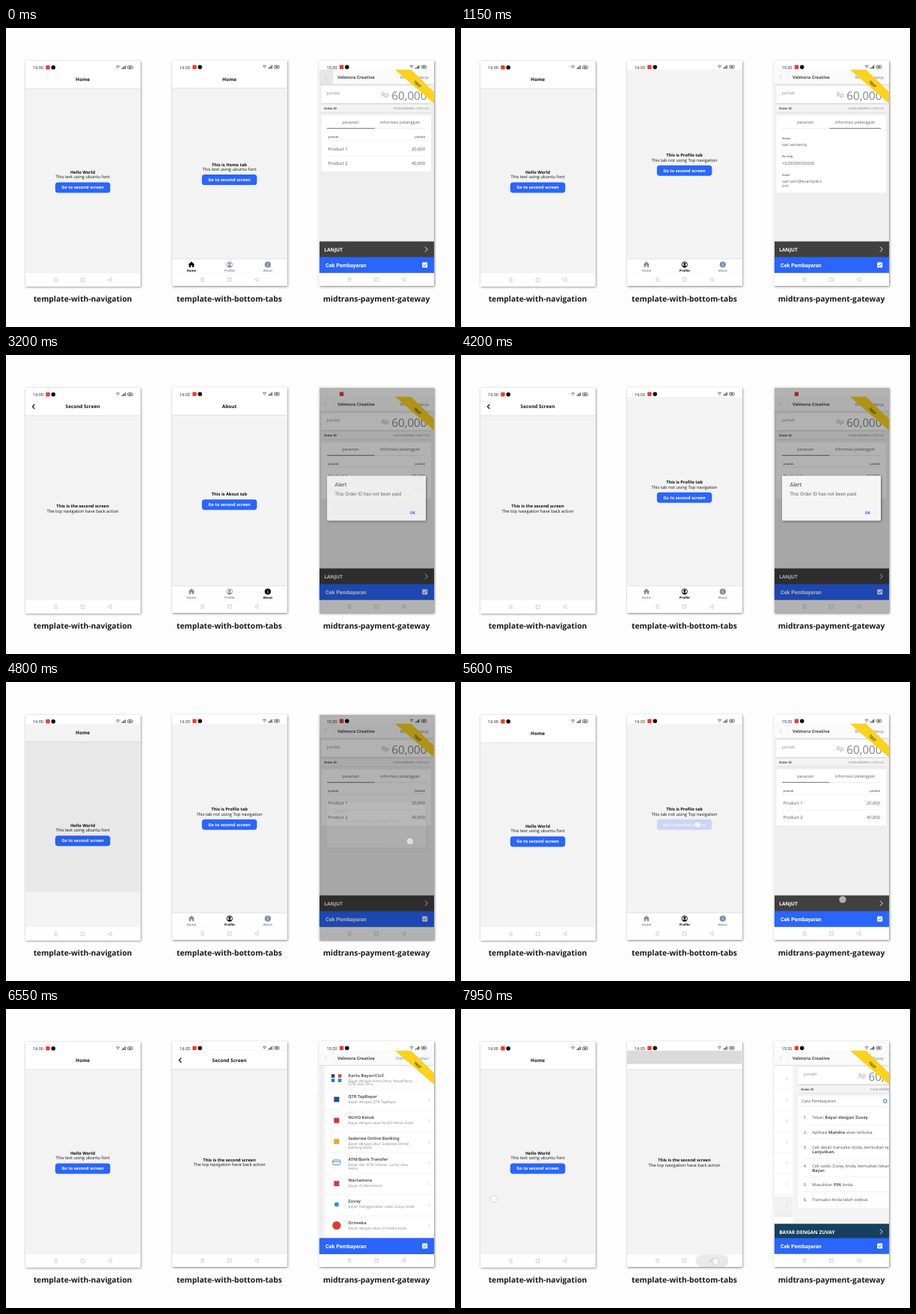
Recreate the animation shown at these times as an HTML page. Size 600 by 400 pixels, loop 8000 ms.

```html
<!DOCTYPE html>
<html lang="en">
<head>
<meta charset="utf-8">
<title>App templates</title>
<style>
html, body { margin: 0; width: 100%; height: 100%; overflow: hidden; background: #fefdfd; }
svg { display: block; width: 600px; height: 400px; }
text { font-family: "Open Sans", "Noto Sans", sans-serif; text-rendering: geometricPrecision; }
.b { font-weight: 700; }
.m { text-anchor: middle; }
.e { text-anchor: end; }
.r { font-family: Roboto, "Liberation Sans", sans-serif; }
</style>
</head>
<body>
<svg id="stage" viewBox="0 0 600 400"></svg>
<script>
const LOOP = 8000, W = 153.5, TOP = 56, BOTTOM = 328, H = BOTTOM - TOP, BLUE = '#2a65fd';

// Drawing helpers; x is local to a phone
const txt = (x, y, s, size, cls = '', fill = '#111') =>
  `<text x="${x}" y="${y}" font-size="${size}" class="${cls}" fill="${fill}">${s}</text>`;
const box = (x, y, w, h, fill, extra = '') =>
  `<rect x="${x}" y="${y}" width="${w}" height="${h}" fill="${fill}" ${extra}/>`;
const path = (d, stroke, w = 0.8, fill = 'none') =>
  `<path d="${d}" stroke="${stroke}" stroke-width="${w}" fill="${fill}"/>`;
const group = (id, body, extra = '') => `<g id="${id}" ${extra}>${body}</g>`;
const hline = (y, x1, x2, c = '#e4e4e4', w = 0.6) => path(`M${x1} ${y}H${x2}`, c, w);

const status = time => group('', txt(10, 55, time, 5.6, 'r', '#333') +
  box(27.2, 50, 5.4, 5.4, '#ee3b36', 'rx="1"') + '<circle cx="37.2" cy="52.7" r="2.8" fill="#111"/>' +
  path('M121 51.5q2.5-2 5 0M122.2 53q1.4-1 2.6 0M123.5 54.4h.6', '#444', 0.8) +
  path('M129 55v-1.5M130.5 55v-2.6M132 55v-3.8M133.3 55v-4.8', '#333', 0.9) +
  box(136.5, 50.7, 6.8, 3.9, 'none', 'rx="1.6" stroke="#444" stroke-width=".8"') +
  box(138.2, 51.9, 3.2, 1.5, '#444'), 'class="status"');

const navBar = box(0, BOTTOM, W, 18, '#fefefe') + group('', '', 'class="ripple"') +
  path('M38 335h5.2M38 337.1h5.2M38 339.2h5.2', '#bdbdbd', 0.7) +
  path('M74.3 334.8h4.6v4.6h-4.6z', '#bdbdbd', 0.7) +
  path('M115 334.4v5.2l-4.8-2.6z', '#bdbdbd', 0.7);

const phone = (id, x, y, time, body, label) => `<g id="${id}" transform="translate(${x} ${y})">
  ${box(0, 44, W, 301.5, '#fff', 'filter="url(#shadow)"')}
  <g clip-path="url(#screen)">${box(0, 44, W, 302, '#fff')}${status(time)}${navBar}
  <g clip-path="url(#app)">${body}</g><g class="top"></g></g>
  ${txt(76.5, 366.4 - y, label, 10.3, 'b m', '#1b1b1b')}</g>`;

const header = title => box(0, TOP, W, 25, '#fff') + hline(81, 0, W, '#d6d6d6', 0.7) +
  txt(76.5, 71.3, title, 6.4, 'b m');
const button = (id, y) => group(id, box(39.8, y, 73.5, 14, BLUE, 'rx="3.6"') +
  txt(76.5, y + 9, 'Go to second screen', 5.7, 'b m', '#fff'));
const intro = (y, title, sub) => txt(76.5, y, title, 5.7, 'b m') + (sub ? txt(76.5, y + 6.5, sub, 5.75, 'm') : '');
const page = body => box(0, TOP, W, H + 8, '#f3f3f3') + body;
const second = page(header('Second Screen') + path('M12.3 66l-3 3 3 3', '#111', 1.1) +
  intro(204.2, 'This is the second screen', 'The top navigation have back action'));

// Old screen below, new screen revealed from the bottom edge
const stack = (id, first) => group(id + 'Old', first) + box(0, TOP, W, H, '#000', `id="${id}Shade"`) +
  `<clipPath id="${id}Clip"><rect id="${id}Cut" width="${W}" height="400"/></clipPath>` +
  `<g clip-path="url(#${id}Clip)">${group(id + 'New', second)}</g>`;

const tabIcons = [
  (x, c) => `<path d="M${x - 4.4} 317l4.4-4 4.4 4h-1.2v3.6h-2.2v-2.5h-2v2.5h-2.2v-3.6z" fill="${c}"/>`,
  (x, c) => `<circle cx="${x}" cy="317" r="3.7" fill="none" stroke="${c}" stroke-width=".9"/>` +
    `<circle cx="${x}" cy="315.9" r="1.6" fill="${c}"/><path d="M${x - 2.7} 319.4q2.7-3.4 5.4 0-2.7 2.6-5.4 0" fill="${c}"/>`,
  (x, c) => `<circle cx="${x}" cy="317" r="4.1" fill="${c}"/>` + path(`M${x} 316.4v2.6M${x} 314.7v.9`, '#fff', 0.9)
];
const tabBar = active => box(0, 309.5, W, 19, '#fff') + hline(309.5, 0, W, '#d6d6d6', 0.7) +
  ['Home', 'Profile', 'About'].map((name, i) => {
    const x = 25.8 + 51 * i, on = i === active;
    return tabIcons[i](x, on ? '#000' : '#7f8ea8') + txt(x, 326, name, 4.2, 'b m', on ? '#000' : '#8b919b');
  }).join('');

const tabs = [
  header('Home') + intro(185, 'This is Home tab', 'This text using ubuntu font') + button('', 196.5),
  intro(172.6, 'This is Profile tab', 'This tab not using Top navigation') + button('press2', 184.2),
  header('About') + intro(188, 'This is About tab') + button('', 193.7)
].map((body, i) => group('tab' + i, page(body + tabBar(i)))).join('');

// Payment screens
const amount = box(3, 78.5, 146.5, 35, '#fff') + box(3, 102, 146.5, 11.5, '#f3f3f3') +
  hline(101.7, 3, 149.5, '#b0b0b0', 0.7) + hline(113.6, 3, 149.5, '#d0d0d0') +
  txt(10, 89, 'jumlah', 5.5, '', '#8a8a8a') + txt(83.3, 92.5, 'Rp', 8, '', '#999') +
  txt(144, 96.7, '60,000', 15.2, 'e', '#858585') +
  txt(6.5, 109.6, 'Order ID', 4, 'b', '#444') + txt(146.5, 109.6, 'YOUR-ORDERID-12351123', 3.9, 'e', '#777');

const tabHead = (x1, x2) => txt(42, 128.6, 'pesanan', 5.6, 'm', '#666') +
  txt(108, 128.6, 'informasi pelanggan', 5.6, 'm', '#666') +
  hline(134.8, 10.5, 142.5, '#d8d8d8') + hline(134.8, x1, x2, '#8d8d8d', 1.3);
const items = [['Product 1', '20,000'], ['Product 2', '40,000']].map(([name, cost], i) =>
  hline(150.6 + 21 * i, 10.5, 142.5, '#e6e6e6') + txt(12, 164.2 + 19 * i, name, 5.8, '', '#555') +
  txt(141.5, 164.2 + 19 * i, cost, 5.8, 'e', '#555')).join('');
const order = group('goods', box(3, 117.5, 146.5, 75, '#fff') + tabHead(10.5, 74) +
  txt(12, 147.5, 'produk', 3.9, 'b', '#777') + txt(141.5, 147.5, 'jumlah', 3.9, 'b e', '#777') + items);
const buyer = group('buyer', box(3, 117.5, 146.5, 103.5, '#fff') + tabHead(74, 142.5) +
  [['Nama', 'sari winanta'], ['No telp.', '+620000000000'], ['Email', 'sari.win@example.c']].map(([k, v], i) =>
    txt(10.5, 149 + 24.5 * i, k, 3.9, 'b', '#777') + txt(10.5, 158.8 + 24.5 * i, v, 5.8, '', '#666')).join('') +
  txt(10.5, 213.8, 'om', 5.8, '', '#666'));

const methods = [
  ['Kartu Bayar/Cicil', '', 'Bayar dengan Kartu Zena, NovaPlatra,', 'QTB, atau Orix'],
  ['QTR TapBayar', '#1d4f9c', 'Bayar dengan QTR TapBayar'],
  ['NUVO Ketuk', '#d8333a', 'Bayar dengan akun NUVO Ketuk Anda'],
  ['Sadarwa Online Banking', '#f0a13a', 'Bayar dengan akun Sadarwa Online', 'Banking Anda'],
  ['ATM/Bank Transfer', 'card', 'Bayar dari ATM Selaras, Lunta, atau', 'Vemo'],
  ['Wartamora', '#d93a3a', 'Bayar di Wartamora'],
  ['Zuvay', '#1c9ad6', 'Bayar menggunakan saldo Zuvay Anda', '', 'round'],
  ['Orimeka', '#e03a34', 'Bayar dengan akun Orimeka Anda', '', 'round']
];
const mark = (y, c, round) => {
  if (!c) return ['#263d8f', '#e0492f', '#2a78b8', '#2b7fc4'].map((f, i) =>
    box(11 + 9 * (i % 2), y - 4 + 6 * (i >> 1), 4.5, 4.5, f)).join('');
  if (c === 'card') return box(13, y - 2, 10, 6.6, 'none', 'rx="1" stroke="#3c8fd0" stroke-width=".9"') + hline(y + 0.2, 13, 23, '#3c8fd0', 1);
  return round ? `<circle cx="18" cy="${y + 1.2}" r="${c === '#1c9ad6' ? 3 : 5.6}" fill="${c}"/>` : box(14.5, y - 2, 7, 7, c);
};
const list = box(3, 76, 146.5, 232, '#fff') + box(3, 251, 146.5, 28, '#f1f1f1', 'id="rowHit"') +
  methods.map(([name, color, a, b, round], i) => {
    const y = 91 + 28.15 * i;
    return txt(33.5, y, name, 5.6, 'b', '#555') + txt(33.5, y + 7, a, 4.9, '', '#888') +
      (b ? txt(33.5, y + 11.8, b, 4.9, '', '#888') : '') + mark(y + 0.8, color, round) +
      path(`M140.5 ${y + 0.6}l2.2 2.3-2.2 2.3`, '#c4c4c4', 0.7) + hline(y + 17.3, 3, 149.5, '#ececec');
  }).join('');

const bold = s => `<tspan class="b">${s}</tspan>`;
const steps = [
  [147.6, `Tekan ${bold('Bayar dengan Zuvay')}.`], [167.6, `Aplikasi ${bold('Mandra')} akan terbuka.`],
  [187.3, 'Cek detail transaksi Anda, kemudian tekan', 'Lanjutkan.'],
  [212.2, 'Cek saldo Zuvay Anda, kemudian tekan', 'Bayar.'],
  [237.2, `Masukkan ${bold('PIN')} Anda.`], [257.2, 'Transaksi Anda telah selesai.']
];
const guide = amount + box(3, 117.5, 146.5, 149, '#fff') + txt(7.5, 125.5, 'Cara Pembayaran', 5.5, '', '#555') +
  '<circle cx="119" cy="123.5" r="2.2" fill="none" stroke="#3a9ad9" stroke-width="1.2"/>' + hline(131, 3, 149.5) +
  steps.map(([y, a, b], i) => txt(10, y, i + 1 + '.', 5.7, '', '#555') + txt(21.5, y, a, 5.7, '', '#555') +
    (b ? txt(21.5, y + 6, b, 5.7, 'b', '#555') : '') +
    (i < 5 ? hline(y + (b ? 13 : 7.8), 10, 142, '#e8e8e8') : '')).join('');

const actionBar = (id, color, s) => group(id, box(0, 286, W, 22, color) +
  txt(6.8, 299.2, s, 6.6, 'b', '#fff') + path('M141.5 293.2l3.2 3.4-3.2 3.4', '#fff', 0.9));
const payment = box(0, TOP, W, H, '#efefef') +
  group('pageA', amount + order + buyer) + group('pageB', box(0, 76, W, 252, '#f5f5f5') + list) +
  group('pageC', box(0, 76, W, 252, '#f4f4f4') + guide) +
  box(0, TOP, W, 20, '#fafafa') + box(0, TOP, 18.5, 20, '#e6e6e6', 'id="backHit"') + hline(76, 0, W, '#d0d0d0', 0.7) +
  path('M10 63.5l-2.6 2.6 2.6 2.6', '#bbb', 0.7) + path('M18.5 56v20', '#ececec', 0.5) +
  txt(24.5, 68.4, 'Velmora Creative', 5.8, 'b', '#484848') +
  ['Rincian Belanja', 'Pilih Pembayaran', 'Zuvay'].map((s, i) =>
    group('title' + i, txt(146.3, 68.2, s, 5.4, 'e', '#777'))).join('') +
  '<path d="M101 56h21.5l31.5 30.5v15.5z" fill="#fbd21c"/>' +
  `<g transform="translate(131 76.2) rotate(42)">${txt(0, 1, 'TEST', 4.8, 'b m', '#333')}</g>` +
  actionBar('next', '#404040', 'LANJUT') + actionBar('pay', '#17405f', 'BAYAR DENGAN ZUVAY') +
  box(0, 307, W, 21, BLUE) + txt(8.5, 320.4, 'Cek Pembayaran', 7.2, 'b r', '#fff') +
  box(137.7, 314, 7, 7, '#fff', 'rx="1"') + path('M139.2 317.5l1.5 1.6 2.7-3.2', BLUE, 1);

const dialog = box(0, 44, W, 302, '#000', 'id="dim"') + group('dialog',
  box(10.5, 162, 132, 60, '#f5f5f5', 'rx="1" filter="url(#shadow)"') +
  txt(20.7, 176.8, 'Alert', 7.6, 'r', '#444') + txt(20.7, 188.5, 'This Order ID has not been paid', 6.4, 'r', '#666') +
  txt(128.5, 213.6, 'OK', 5.4, 'b r e', '#3f66c8'));

const stage = document.getElementById('stage');
stage.innerHTML = `<defs>
  <filter id="shadow" x="-10%" y="-10%" width="120%" height="120%"><feDropShadow dx=".8" dy="1" stdDeviation="1.7" flood-opacity=".5"/></filter>
  <clipPath id="screen"><rect y="44" width="${W}" height="301.5"/></clipPath>
  <clipPath id="app"><rect y="${TOP}" width="${W}" height="${H}"/></clipPath></defs>` +
  phone('p1', 26, 0, '16:00', stack('one', page(header('Home') +
    intro(194.8, 'Hello World', 'This text using ubuntu font') + button('press1', 206.4))), 'template-with-navigation') +
  phone('p2', 222, -0.5, '16:03', stack('two', tabs), 'template-with-bottom-tabs') +
  phone('p3', 418.5, -0.5, '15:20', payment, 'midtrans-payment-gateway') + '<g id="touches"></g>';
stage.querySelector('#p3 .top').innerHTML = dialog;
stage.querySelector('#p2 .ripple').innerHTML = box(91.5, 328.8, 44, 17, '#e9e9e9', 'rx="8.5" id="navHit"');

// x, y, from, to
const touches = [
  [110, 213, 1550, 1765], [36.5, 69, 4450, 4650], [44, 254, 7300, 8000],
  [298, 318, 700, 900], [349, 318, 2300, 2500], [298, 318, 4060, 4200], [316, 191, 5400, 5700], [340, 338, 7800, 8000],
  [526, 127, 1000, 1150], [460, 127, 2450, 2600], [490, 318, 2850, 3000], [540, 213, 4600, 4850],
  [510, 291, 5500, 5700], [490, 260, 7500, 7700]
];
const $ = id => document.getElementById(id);
const dots = touches.map(([x, y]) => {
  $('touches').insertAdjacentHTML('beforeend',
    `<circle cx="${x}" cy="${y}" r="4.6" fill="#fff" fill-opacity=".6" stroke="#888" stroke-opacity=".5" stroke-width=".6"/>`);
  return $('touches').lastChild;
});

const ramp = (t, from, dur) => Math.min(1, Math.max(0, (t - from) / dur));
const outCubic = u => 1 - (1 - u) ** 3;
// cubic-bezier(.35, .45, 0, 1)
const ease = u => {
  let lo = 0, hi = 1;
  for (let i = 0; i < 24; i++) {
    const s = (lo + hi) / 2;
    if (1.05 * s * (1 - s) ** 2 + s ** 3 < u) lo = s; else hi = s;
  }
  return u >= 1 ? 1 : 1.35 * lo * (1 - lo) ** 2 + 3 * lo * lo * (1 - lo) + lo ** 3;
};
const show = (el, on) => el.setAttribute('visibility', on ? 'inherit' : 'hidden');
const fade = (id, v) => $(id).setAttribute('opacity', v);
const move = (id, x, y = 0) => $(id).setAttribute('transform', `translate(${x} ${y})`);

function reveal(id, t, open, close) {
  const p = ease(ramp(t, open, 425)) - ease(ramp(t, close, 425)), rest = H * (1 - p);
  move(id + 'Old', 0, -0.02 * H * p);
  move(id + 'New', 0, 0.041 * rest);
  $(id + 'Cut').setAttribute('y', TOP + rest);
  fade(id + 'Shade', 0.1 * Math.min(1, p / 0.36));
}
const press = (id, t, from, to) => fade(id, 1 - 0.8 * (ramp(t, from, 150) - ramp(t, to, 250)));

function draw(t) {
  reveal('one', t, 1765, 4648);
  press('press1', t, 1550, 1765);
  reveal('two', t, 5700, 7930);
  press('press2', t, 5400, 5700);
  const tab = t < 900 ? 0 : t >= 2500 && t < 4200 ? 2 : 1;
  for (let i = 0; i < 3; i++) show($('tab' + i), i === tab);
  fade('navHit', ramp(t, 7800, 100));

  const info = t >= 1150 && t < 2600;
  show($('goods'), !info);
  show($('buyer'), info);
  fade('backHit', 1 - ramp(t, 300, 300));
  fade('dim', 0.3 * (ramp(t, 3000, 150) - ramp(t, 4800, 200)));
  fade('dialog', ramp(t, 3020, 200) - ramp(t, 4680, 133));
  // Clock and icons turn invisible behind the dialog; the red badge stays
  const dimmed = t >= 3150 && t < 4700;
  [...stage.querySelector('#p3 .status').children].forEach((el, i) => show(el, !dimmed || i === 1));

  const s1 = outCubic(ramp(t, 6280, 400)), s2 = outCubic(ramp(t, 7780, 400));
  move('pageA', -154 * s1);
  move('pageB', 154 * (1 - s1 - s2));
  move('pageC', 154 * (1 - s2));
  move('next', 0, 22 * s1);
  move('pay', 0, 22 * (1 - s2) ** 1.5);
  const step = s2 > 0.5 ? 2 : s1 > 0.5 ? 1 : 0;
  for (let i = 0; i < 3; i++) show($('title' + i), i === step);
  show($('rowHit'), t >= 7550);

  touches.forEach(([, , from, to], i) => show(dots[i], t >= from && t < to));
}

function frame() {
  draw(Math.floor(performance.now() % LOOP / 50) * 50);
  requestAnimationFrame(frame);
}
frame();
</script>
</body>
</html>
```
